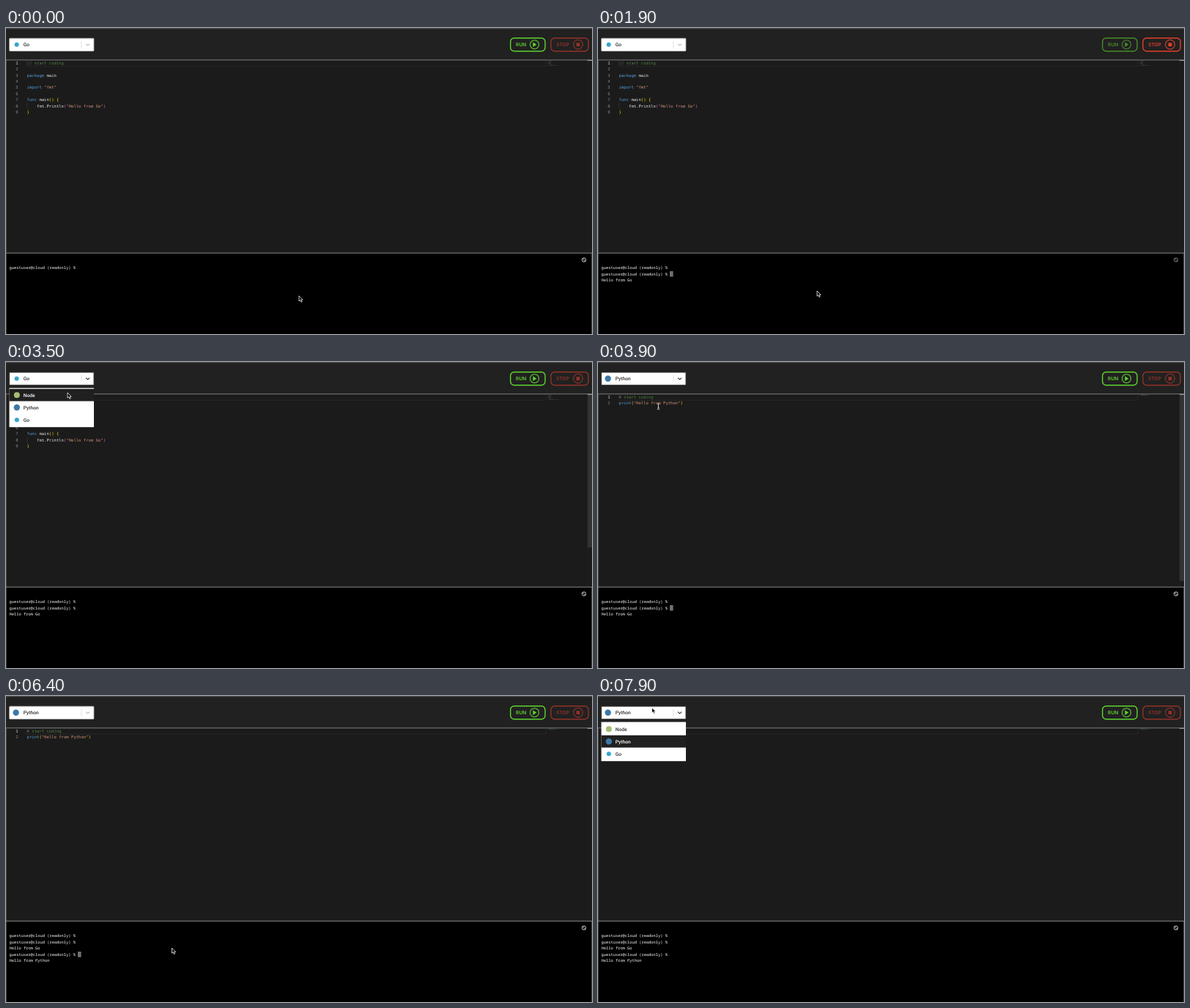
Animation of 800 by 419 pixels, one loop 8 s. Source, as an HTML page:

```html
<!DOCTYPE html>
<html lang="en">
<head>
<meta charset="utf-8">
<title>Code runner</title>
<style>
  html, body { margin: 0; width: 100%; height: 100%; overflow: hidden; background: #000; }
  svg { display: block; width: 100%; height: 100%; }
  text { white-space: pre; text-rendering: geometricPrecision; }
  .code text { font: 5.58px "DejaVu Sans Mono", monospace; fill: #e4e4e4; }
  .code .num { fill: #858585; text-anchor: end; }
  .code .active { fill: #d8d8d8; }
  .comment { fill: #4f7f41; }
  .keyword { fill: #569cd6; }
  .string { fill: #ce9178; }
  .gold { fill: #ffd700; }
  .pink { fill: #c268bf; }
  #terminal text { font: 5.38px "Noto Sans Mono", monospace; fill: #fff; }
  .label { font: 500 6.6px Roboto, sans-serif; fill: #2b2b2b; }
  .button { fill: none; stroke: currentColor; stroke-width: 1.4; }
  .button text { font: 600 6.6px Inter, sans-serif; fill: currentColor; stroke: none; }
  .button .solid { fill: currentColor; stroke: none; }
</style>
</head>
<body>
<svg viewBox="0 0 800 419">
  <rect width="800" height="419" fill="#1b1b1b"/>
  <rect width="800" height="44" fill="#212121"/>
  <rect width="800" height="1.3" fill="#484848"/>

  <g class="code">
    <rect x="28" y="44" width="709" height="8.2" fill="none" stroke="#282828" stroke-width=".8"/>
    <g id="go"></g>
    <g id="python"></g>
  </g>
  <g id="minimap" fill="#34483a"></g>
  <path d="M793.5 44V308" stroke="#222" stroke-width=".7"/>
  <rect id="scrollbar" x="794" y="44" width="6" fill="#323232"/>
  <rect x="794" y="43.8" width="6" height="1.2" fill="#a0a090"/>
  <path d="M0 43.8H800" stroke="#858585" stroke-width=".9"/>

  <rect y="308" width="800" height="111" fill="#000"/>
  <path d="M.3 44V419M799.7 308V419" stroke="#777" stroke-width=".6"/>
  <path d="M0 308.2H800" stroke="#999" stroke-width=".9"/>
  <g id="terminal"></g>
  <rect id="caret" x="98" width="4.6" height="7.6" fill="#707070"/>
  <g id="clear" fill="none" stroke="#fff" stroke-width=".8">
    <circle cx="789" cy="317.5" r="2.7"/>
    <path d="M787.1 315.6l3.8 3.8"/>
  </g>

  <g id="run" class="button" color="#5fd32e">
    <rect x="688.7" y="13.7" width="47.3" height="18" rx="5"/>
    <text x="696" y="25" letter-spacing=".1">RUN</text>
    <circle cx="721.5" cy="22.7" r="6" stroke-width="1.1"/>
    <path class="solid" d="M719.4 19.5v6.4l5-3.2z"/>
  </g>
  <g id="stop" class="button" color="#ee402c">
    <rect x="743.9" y="13.7" width="51.2" height="18" rx="5"/>
    <text x="751.2" y="25">STOP</text>
    <circle cx="781" cy="22.7" r="6.4" stroke-width="1.1"/>
    <rect class="solid" x="778.6" y="20.3" width="4.8" height="4.8"/>
  </g>

  <rect id="select" x="4.7" y="14.2" width="115.2" height="17.4" rx=".8" fill="#fff" stroke-width=".7"/>
  <circle id="badge" cy="22.8"/>
  <text id="chosen" class="label" x="23.8" y="25.1"></text>
  <path d="M103 18v9.8" stroke="#ccc" stroke-width=".6"/>
  <path id="chevron" d="M109 21.6l2.6 2.5 2.6-2.5" fill="none" stroke-width="1.1"/>
  <g id="menu"></g>

  <path id="arrow" d="M0 0V7.2L1.7 5.7 2.9 8.5 4.2 7.9 3 5.3H5.2Z" fill="#000" stroke="#fff" stroke-width=".75"/>
  <g id="beam" fill="none">
    <path d="M-1.7-3.8Q0-3.8 0-2.8Q0-3.8 1.7-3.8M0-2.8V2.8M-1.7 3.8Q0 3.8 0 2.8Q0 3.8 1.7 3.8M-1 1.2H1" stroke="#ddd" stroke-width=".9"/>
  </g>
</svg>
<script>
const LOOP = 8000, STEP = 100, LINE = 8.37, TERM_LINE = 8.55;
const $ = id => document.getElementById(id);
const show = (id, on) => $(id).setAttribute("visibility", on ? "visible" : "hidden");
const set = (id, attrs) => {
  for (const name in attrs) $(id).setAttribute(name, attrs[name]);
};

const languages = {
  Node: { color: "#a3bd72", r: 4 },
  Python: { color: "#3b78a8", r: 4.2 },
  Go: { color: "#35a7cb", r: 3 }
};
const menuItems = Object.keys(languages);

// Each line is a list of [text, class] tokens.
const goCode = [
  [["// start coding", "comment"]],
  [],
  [["package", "keyword"], [" main"]],
  [],
  [["import", "keyword"], [" "], ['"fmt"', "string"]],
  [],
  [["func", "keyword"], [" main"], ["()", "gold"], [" "], ["{", "gold"]],
  [["    fmt.Println"], ["(", "pink"], ['"Hello from Go"', "string"], [")", "pink"]],
  [["}", "gold"]]
];
const pythonCode = [
  [["# start coding", "comment"]],
  [["print", "keyword"], ["(", "gold"], ['"Hello from Python"', "string"], [")", "gold"]]
];

const codeMarkup = lines => lines.map((tokens, i) => {
  const y = 50 + i * LINE;
  const spans = tokens.map(([text, type = ""]) => `<tspan class="${type}">${text}</tspan>`).join("");
  return `<text class="num ${i ? "" : "active"}" x="16.6" y="${y}">${i + 1}</text>
    <text x="28.6" y="${y}">${spans}</text>`;
}).join("");
$("go").innerHTML = codeMarkup(goCode) +
  '<path d="M29 102.5v8.4" stroke="#404040" stroke-width=".6"/>';
$("python").innerHTML = codeMarkup(pythonCode);

const prompt = "guestuser@cloud (readonly) %";
const output = [
  [0, prompt], [1600, prompt], [1800, "Hello from Go"],
  [6100, prompt], [6300, "Hello from Python"]
];
$("terminal").innerHTML = output.map(([, text], i) =>
  `<text x="4.6" y="${330 + i * TERM_LINE}">${text}</text>`).join("");

$("menu").innerHTML = '<rect x="4.5" y="35.6" width="115.5" height="53.6" fill="#fff"/>' +
  menuItems.map((name, i) => {
    const y = 45.2 + i * 17, { color, r } = languages[name];
    return `<rect id="row${name}" x="4.5" y="${y - 8.4}" width="115.5" height="16.8" fill="#202020"/>
      <circle cx="14.8" cy="${y}" r="${r}" fill="${color}"/>
      <text id="item${name}" class="label" x="23.8" y="${y + 2.4}">${name}</text>`;
  }).join("");

// Linear interpolation through [time, ...values] keys.
function track(keys, t) {
  const next = keys.findIndex(key => key[0] > t);
  if (next < 0) return keys[keys.length - 1].slice(1);
  if (next === 0) return keys[0].slice(1);
  const a = keys[next - 1], b = keys[next];
  const k = (t - a[0]) / (b[0] - a[0]);
  return a.slice(1).map((v, i) => v + (b[i + 1] - v) * k);
}

const pointerPath = [
  [0, 400, 366.8], [100, 388.6, 363.3], [200, 388.6, 363.3], [400, 325, 360],
  [500, 297.5, 359], [700, 297.5, 359], [800, 299, 360], [2300, 299, 360],
  [2400, 290, 367], [2500, 268, 335], [2700, 170, 150], [2900, 110, 40],
  [3000, 101, 29], [3200, 86, 23], [3300, 86, 23], [3500, 84, 42],
  [3700, 82.5, 61], [3900, 82.5, 61], [4000, 90, 78], [4300, 165, 230],
  [4600, 222, 338], [4700, 226.5, 345], [6400, 226.5, 345], [6600, 165, 200],
  [6800, 92, 38], [6900, 78, 14], [7000, 76, 10], [7300, 73.6, 16]
];
const runLevels = [
  [1400, 0], [1700, 1], [1900, 1], [2200, 0], [6000, 0], [6200, .7], [6400, 0]
];

const within = (t, from, to) => t >= from && t < to;

function caretOn(t) {
  const start = t < 1600 ? -700 : 1600;
  const phase = t >= 6100 ? t - 6100 : t - start;
  return Math.floor(phase / 500) % 2 === 0;
}

function render(t) {
  const language = t < 3900 ? "Go" : "Python";
  const isGo = language === "Go";
  const menuOpen = within(t, 3400, 3900) || t >= 7600;
  const focused = within(t, 3400, 6100) || t >= 7600;
  const [x, y] = track(pointerPath, t);
  const [running] = track(runLevels, t);

  show("go", isGo);
  show("python", !isGo);
  $("minimap").innerHTML = isGo
    ? '<path d="M740 45.2h5v.8h-5zM740 47h4v.7h-4zM740 48.6h4v.7h-4zM741 50h6v.6h-6z"/><path d="M740 51h15v.5h-15z" fill="#383838"/>'
    : '<path d="M740 44.4h7v.7h-7zM740 45.3h12v.6h-12z"/>';
  show("scrollbar", within(t, 2600, 5100) || within(t, 6600, 6900));
  set("scrollbar", { height: isGo ? 210 : 256 });

  const { color, r } = languages[language];
  set("badge", { cx: isGo ? 14.6 : 13.6, r, fill: color });
  $("chosen").textContent = language;
  set("select", { stroke: focused ? "#333" : "#ccc" });
  set("chevron", { stroke: focused ? "#333" : "#bbb" });

  set("run", { opacity: 1 - .4 * running });
  set("stop", { opacity: .55 + .4 * running });
  set("clear", { opacity: 1 - .4 * running });

  show("menu", menuOpen);
  const hovered = y > 36.8 && y < 87.6 ? menuItems[Math.floor((y - 36.8) / 17)] : language;
  for (const name of menuItems) {
    show("row" + name, menuOpen && name === hovered);
    $("item" + name).style.fill = name === hovered ? "#fff" : "";
  }

  [...$("terminal").children].forEach((line, i) =>
    line.setAttribute("visibility", t >= output[i][0] ? "visible" : "hidden"));
  const caretLine = t < 1600 ? 0 : t < 6100 ? 1 : 3;
  set("caret", { y: 324.4 + caretLine * TERM_LINE });
  show("caret", caretOn(t));

  const overEditor = y > 44 && y < 308 && !menuOpen;
  const position = { transform: `translate(${x} ${y})` };
  set("arrow", position);
  set("beam", position);
  show("arrow", !overEditor);
  show("beam", overEditor);
}

const origin = performance.now();
function frame() {
  const elapsed = (performance.now() - origin) % LOOP;
  render(Math.floor(elapsed / STEP) * STEP);
  requestAnimationFrame(frame);
}
frame();
</script>
</body>
</html>
```
